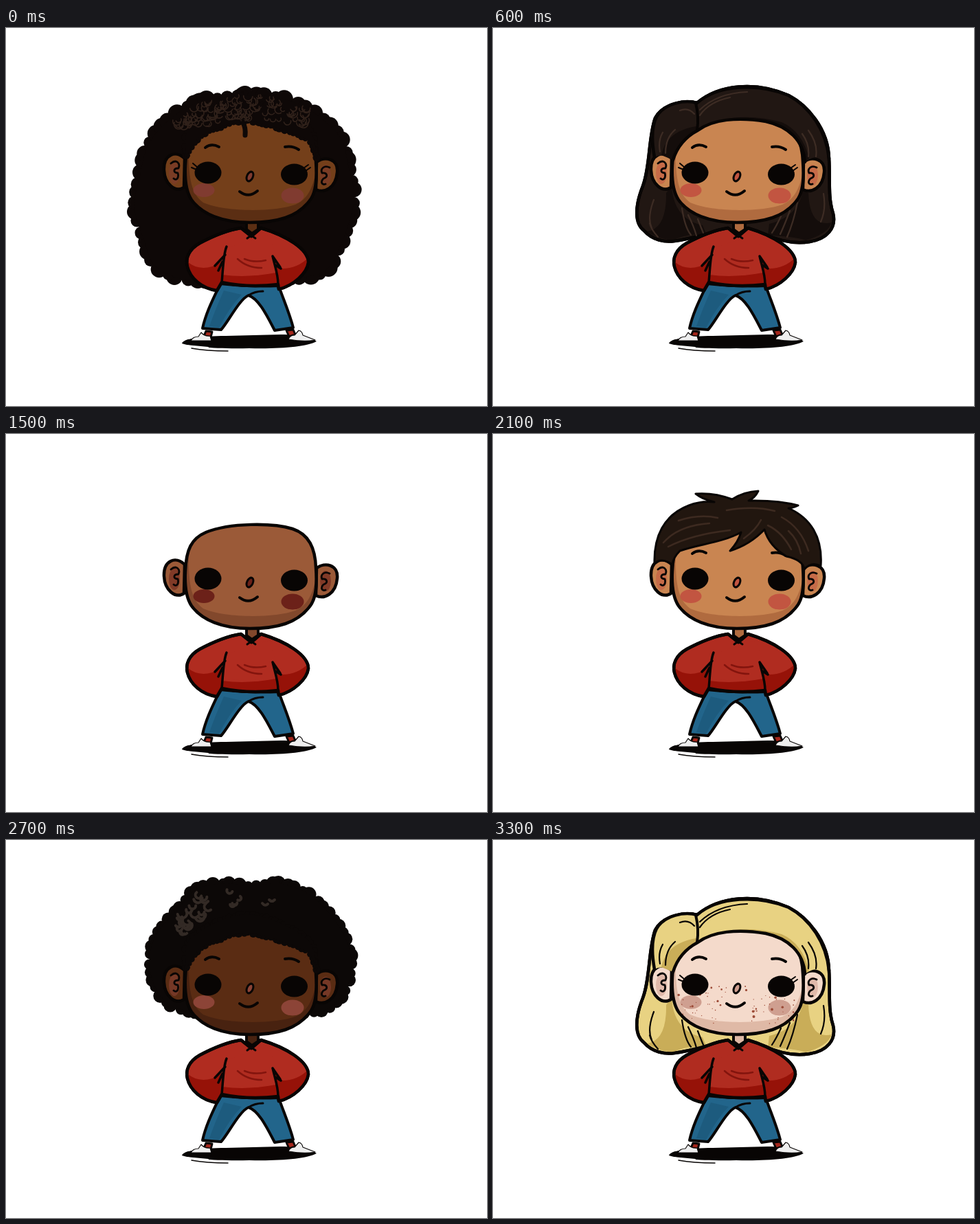
Write an HTML page that moves like this. It is 700 by 550 pixels and loops after 3.6 s.

```html
<!DOCTYPE html>
<html lang="en">
<head>
<meta charset="utf-8">
<title>Characters</title>
<style>
html, body { margin: 0; width: 100%; height: 100%; overflow: hidden; background: #fff; }
svg { display: block; width: 100%; height: 100%; }
</style>
</head>
<body>
<svg id="stage" viewBox="0 0 700 550" stroke-linecap="round" stroke-linejoin="round"></svg>
<script>
const INK = '#080504';
const HOLD = 300;
const NS = 'http://www.w3.org/2000/svg';
const stage = document.getElementById('stage');

const path = (d, fill = 'none', width = 0, line = INK, extra = '') =>
  `<path d="${d}" fill="${fill}" stroke="${width ? line : 'none'}" stroke-width="${width}" ${extra}/>`;
const oval = (x, y, rx, ry, fill, extra = '') =>
  `<ellipse cx="${x}" cy="${y}" rx="${rx}" ry="${ry}" fill="${fill}" ${extra}/>`;
const times = (n, fn) => Array.from({ length: n }, (_, i) => fn(i)).join('');

function random(seed) {
  return () => {
    seed = (seed * 1664525 + 1013904223) % 4294967296;
    return seed / 4294967296;
  };
}

// Smooth curve through "x y x y ..."
function spline(text) {
  const n = text.trim().split(/\s+/).map(Number);
  const last = n.length / 2 - 1;
  const at = i => { const k = 2 * Math.max(0, Math.min(last, i)); return [n[k], n[k + 1]]; };
  let d = `M${at(0)}`;
  for (let i = 0; i < last; i++) {
    const [a, b, c, e] = [at(i - 1), at(i), at(i + 1), at(i + 2)];
    const near = b.map((v, k) => v + (c[k] - a[k]) / 6);
    const far = c.map((v, k) => v - (e[k] - b[k]) / 6);
    d += `C${near} ${far} ${c}`;
  }
  return d;
}
const region = (outer, inner) => spline(outer) + spline(inner).replace('M', 'L') + 'Z';

function measure(d) {
  const el = document.createElementNS(NS, 'path');
  el.setAttribute('d', d);
  const length = el.getTotalLength();
  return { length, at: t => el.getPointAtLength(t * length) };
}

// Outer runs left to right, inner runs back; u goes from outer to inner
function band(outer, inner) {
  const a = measure(spline(outer)), b = measure(spline(inner));
  return (t, u) => {
    const p = a.at(t), q = b.at(1 - t);
    return [p.x + (q.x - p.x) * u, p.y + (q.y - p.y) * u];
  };
}

// Filled shape with a scalloped edge
function curly(d, r, fill, width = 0, seed = 7) {
  const rnd = random(seed), edge = measure(d);
  const count = Math.round(edge.length / (r * 1.35));
  return times(count, i => {
    const p = edge.at((i + rnd() * 0.5) / count), s = r * (0.75 + rnd() * 0.45);
    return oval(p.x.toFixed(1), p.y.toFixed(1), s.toFixed(1), s.toFixed(1), fill,
      width ? `stroke="${INK}" stroke-width="${width}"` : '');
  }) + path(d, fill);
}

function curls(at, n, color, width, seed, t0 = 0, t1 = 1, u0 = 0, u1 = 1) {
  const rnd = random(seed);
  return times(n, () => {
    const [x, y] = at(t0 + (t1 - t0) * rnd(), u0 + (u1 - u0) * rnd());
    const s = 3 + rnd() * 4, turn = rnd() * 120 - 60;
    return path(`M${-s} 0A${s} ${s} 0 0 0 ${s} 0`, 'none', width, color,
      `transform="translate(${x.toFixed(1)} ${y.toFixed(1)}) rotate(${turn.toFixed(0)})"`);
  });
}

const HEAD = 'M261 200C262 168 270 152 291 143C326 129 388 129 417 138C441 146 450 166 451 195C453 222 451 240 442 251C424 275 395 283 355 283C315 283 285 271 270 250C262 238 260 220 261 200Z';
const SWEATER = 'M342 291C322 294 299 304 282 313C266 322 261 335 264 347C268 364 285 379 307 382L314 370C342 376 372 376 396 373L397 380C418 375 438 357 440 341C440 322 408 302 371 291L357 303Z';
const PANTS = 'M312 372Q355 377 397 375C402 391 412 413 418 436L391 440C380 419 368 394 353 389C340 394 322 430 313 439L286 437C291 414 302 393 312 372Z';

const body =
  path('M256 459C258 452 282 448 320 448L400 446C428 446 444 450 452 456C437 464 400 467 354 466C305 467 270 464 256 459Z', INK) +
  path('M262 462L294 465M258 453L276 450', 'none', 2, '#fff') +
  path('M270 466Q292 470 323 470', 'none', 1.5) +
  path('M291 441L300 442L298 450L288 448ZM408 440L418 439L421 446L412 449Z', '#a4261b', 3) +
  path('M269 455Q272 449 280 449L284 443Q289 449 297 448L299 455Z', '#eee', 1.2) +
  path('M411 453Q413 447 420 447L426 440Q431 441 432 447L450 454Q434 457 411 453Z', '#eee', 1.2) +
  path(PANTS, '#22658b', 4) +
  path('M317 382Q306 406 296 434L310 436Q326 405 343 388Z', '#1d5b7e') +
  path('M353 389Q362 383 374 383', 'none', 3) +
  path(SWEATER, '#b02c20', 4.5) +
  `<g clip-path="url(#sweater)">` +
  path('M264 340Q279 353 300 347L313 340L315 359Q350 364 393 356L389 334L402 350Q425 350 441 333L438 389L260 389Z', '#961208') +
  path('M315 360Q335 354 350 359Q370 362 391 352L392 330L384 300L320 320Z', '#b02c20') + '</g>' +
  path(SWEATER, 'none', 4.5) +
  path('M321 318C316 330 316 350 314 370M319 330L304 346M315 340L309 353M388 332C391 346 396 358 396 373M388 332L399 348M392 345L400 350', 'none', 3.5) +
  path('M337 336Q351 349 372 349M347 336Q361 342 378 338', 'none', 2.5, '#83140d') +
  path('M350 282V293L358 299L367 293V282Z', 'var(--shade)', 4) +
  path('M342 291L363 306M371 291L351 306', 'none', 3);

function freckles() {
  const rnd = random(21);
  return times(95, () => {
    const x = 270 + rnd() * 176, y = 213 + rnd() * 54;
    const mid = Math.abs(x - 354) < 18 && y > 224;
    return mid ? '' : oval(x.toFixed(1), y.toFixed(1), ...Array(2).fill((0.6 + rnd() ** 3 * 1.5).toFixed(1)), '#9c4a36');
  });
}

function face(look) {
  const { skin, shade, cheek } = look;
  return path('M260 190C247 177 229 184 230 207C231 227 246 240 259 232ZM452 195C464 186 484 190 482 210C480 233 463 241 451 235Z', skin, 4.5) +
    oval(245, 211, 8, 16, cheek, 'opacity=".55"') + oval(465, 214, 8, 15, cheek, 'opacity=".55"') +
    path('M240 197C248 190 254 197 251 204C243 204 243 211 250 211C252 218 248 223 244 219M471 203C463 199 457 205 460 211C468 210 469 217 462 219C457 224 460 229 465 227', 'none', 2.8) +
    path(HEAD, skin) +
    path('M255 165H266C265 215 268 240 287 254C318 268 390 268 421 257C441 248 447 230 452 205V300H255Z', shade, 0, INK, 'clip-path="url(#head)"') +
    oval(288, 236, 15.5, 10, cheek) + oval(417, 244, 16.5, 11.5, cheek) +
    (look.freckles ? freckles() : '') +
    path(HEAD, 'none', 4.5) +
    oval(294, 210.5, 19.5, 16, INK) + oval(419.5, 213, 19.5, 15.5, INK) +
    (look.lashes ? path('M272 197L279 203M270 203L277 206M443 203L436 208M440 199L433 204', 'none', 2) : '') +
    oval(355, 216, 4.3, 7.3, look.nose || cheek, `stroke="${INK}" stroke-width="3" transform="rotate(25 355 216)"`) +
    path('M340 238Q353 248 366 237', 'none', 4) +
    (look.brows === false ? '' : path('M290 174Q299 167 310 173M406 173Q417 171 426 177', 'none', 4));
}

const HAIRLINE = '452 190 440 164 400 147 350 140 310 145 280 160 262 188';
const CAP = '262 186 270 142 350 108 436 142 452 188';
const crown = color => curly(region(CAP, HAIRLINE.replace('350 140', '350 135')), 5, color);

function bigCurls() {
  const dark = '#0e0807', top = band('240 135 290 104 350 97 395 98 440 118', '435 140 350 135 260 145');
  const edge = '345 98 395 101 438 117 470 141 490 165 498 200 507 245 497 290 484 322 468 350 436 362 350 366 268 366 240 360 214 343 203 315 187 262 195 215 207 170 238 133 278 108 312 102 345 98';
  return {
    back: curly(spline(edge) + 'Z', 11, dark),
    front: crown(dark) + curls(top, 120, '#31221b', 1.6, 5) +
      path('M345 138Q349 145 348 156', 'none', 7, dark) +
      path('M274 101Q283 94 297 102M338 92Q348 84 355 91', 'none', 7, dark)
  };
}

function gingerCurls() {
  const outer = '229 183 236 150 262 121 296 107 350 97 395 100 443 117 469 143 478 184';
  const inner = '452 182 440 167 412 151 380 142 350 138 320 145 290 157 271 172 262 184';
  const at = band(outer, inner), d = region(outer, inner);
  const low = '445 117 469 143 478 184', under = '452 182 440 167 412 151 380 142 345 136 380 124 410 136 438 142';
  return {
    front: curly(d, 9, '#f27a17', 4) +
      path(region(low, under), '#a5460f') +
      path('M262 184Q285 151 345 137L322 133Q280 145 249 176Z', '#c75511') +
      curls(at, 55, '#ffa044', 2, 9, 0, 0.75, 0, 0.6) +
      curls(at, 65, INK, 2.4, 12)
  };
}

function dread(x, y, end, k) {
  const wave = `M${x} ${y}q${k % 2 ? 4 : -4} ${(end - y) / 4} 0 ${(end - y) / 2}t0 ${(end - y) / 2}`;
  const ticks = times(Math.floor((end - y) / 8), i => path(`M${x - 3} ${y + 6 + i * 8}l6 4`, 'none', 2));
  return path(wave, 'none', 12) + path(wave, 'none', 6.5, '#ad651d') + ticks;
}

function dreads() {
  const outer = '250 198 253 168 275 133 310 112 350 104 390 109 425 127 452 158 463 196';
  const inner = '452 195 440 171 418 154 388 141 352 137 318 143 290 156 270 176 262 195';
  const at = band(outer, inner), n = 25;
  const ends = [[251, 232, 302], [268, 250, 303], [287, 264, 306], [308, 276, 300], [322, 280, 296], [388, 280, 296],
    [402, 278, 300], [416, 270, 302], [430, 260, 306], [446, 248, 302], [461, 234, 306]];
  return {
    back: ends.map((e, k) => dread(...e, k)).join(''),
    front: times(n, i => { const [x, y] = at((i + 0.5) / n, 0); return oval(x, y, 7, 7, '#ad651d', `stroke="${INK}" stroke-width="4"`); }) +
      path(region(outer, inner), '#ad651d', 4) +
      times(n, i => {
        const t = i / n, [a, b, c] = [at(t, 0), at(t + 0.015, 0.5), at(t, 1)];
        const [e, f] = [at(t + 0.02, 0.45), at(t + 0.02, 0.9)];
        return path(`M${e}L${f}`, 'none', 3, '#713a10') + path(`M${a}Q${b} ${c}`, 'none', 3);
      })
  };
}

function shortHair() {
  const dark = '#21160f';
  const d = 'M235 188C234 150 248 118 285 104Q303 97 322 99Q305 95 295 87Q322 85 348 95Q365 84 386 83Q381 93 372 97Q415 96 444 104Q436 108 430 108C462 122 480 150 477 192Q463 185 453 197Q451 183 427 178Q402 163 395 139Q374 161 345 170Q357 157 361 143C334 158 300 160 272 170Q262 180 261 190Q246 179 235 188Z';
  return {
    front: path(d, dark, 3) +
      path('M248 158Q270 133 315 130M255 164Q290 146 345 140M270 126Q300 116 327 122M365 152Q383 139 390 125M400 133Q421 143 434 168M420 121Q448 136 459 170M340 111Q380 104 410 112M430 141Q444 154 448 174', 'none', 2.5, '#3d2a20')
  };
}

function afro() {
  const dark = '#0c0807', shine = '#332a25';
  const edge = '395 62 436 76 467 103 490 135 502 170 498 210 480 236 450 250 350 255 258 247 228 231 212 200 209 170 220 135 251 100 276 72 320 63 352 67 395 62';
  const at = band('222 142 260 95 300 70 340 72', '340 92 300 103 265 135');
  return {
    back: curly(spline(edge) + 'Z', 9, dark),
    front: crown(dark) + curls(at, 26, shine, 4, 3) + path('M373 92q4 5 8 1M383 87q4 4 8 0', 'none', 4, shine)
  };
}

function bob(fill, dark, line = INK) {
  const back = 'M297 109C279 104 246 111 236 131C226 158 229 201 218 230C206 260 206 285 220 295C232 309 251 312 264 310Q285 307 310 300H395Q430 316 461 311C486 307 500 291 495 270C487 246 491 217 489 190C488 146 457 112 430 98C382 77 329 82 297 109Z';
  const front = 'M297 109C328 82 386 80 430 98C462 115 485 150 486 190Q469 183 454 195C452 164 430 143 397 136C356 129 319 133 298 149C277 160 267 176 262 192Q248 181 235 188C231 166 231 143 238 129C250 109 279 104 297 109Z';
  return {
    back: path(back, fill, 4.5) +
      path('M260 230Q263 278 305 287L312 304Q287 296 262 309Q240 307 224 296Q253 292 252 240ZM451 236Q444 275 402 285L400 302Q438 303 455 309Q487 300 493 283Q461 291 459 240Z', dark) +
      path(back, 'none', 4.5) +
      path('M275 262Q279 290 288 301M284 272Q292 288 296 302M298 278Q303 291 306 298M432 266Q424 287 418 300M419 274Q412 289 406 298M443 254Q437 284 428 304M234 250Q224 276 231 291M481 241Q485 264 477 282M240 304Q230 293 228 284', 'none', 2.2, line),
    front: path(front, fill) +
      path('M298 148Q350 118 420 137Q450 150 460 190L454 195Q450 150 397 136Q340 127 298 148ZM245 185Q252 150 296 143L298 149Q268 163 262 192Z', dark) +
      path('M297 109C328 82 386 80 430 98C462 115 485 150 489 190M235 188C231 166 231 143 238 129C250 109 279 104 297 109M454 195C452 164 430 143 397 136C356 129 319 133 298 149C277 160 267 176 262 192', 'none', 4.5) +
      path('M295 109Q300 130 297 149', 'none', 4) +
      path('M301 119Q326 95 370 93M301 127Q315 107 345 101M272 120Q284 115 293 125M251 182Q251 160 265 148M243 180Q240 164 247 152M450 154Q461 169 459 187M459 149Q473 168 470 187', 'none', 2.2, line)
  };
}

function wavy() {
  const outer = '222 188 228 150 255 116 300 99 350 97 410 101 455 122 478 155 483 188';
  const inner = '452 188 438 163 400 146 350 148 310 142 280 160 262 188';
  return { front: curly(region(outer, inner), 8, '#4a2a18', 3.5, 4) + curls(band(outer, inner), 45, '#22120a', 2.4, 6) };
}

function topBun() {
  const outer = '240 190 250 150 285 118 350 108 420 118 455 150 468 190';
  return {
    back: oval(354, 70, 44, 43, '#1c1311', `stroke="${INK}" stroke-width="4"`),
    front: path(region(outer, HAIRLINE), '#1c1311', 4) +
      path('M272 164Q290 132 335 114M310 142Q325 125 345 114M400 144Q385 124 365 114M438 160Q418 130 375 114M325 68Q350 42 380 66M330 86Q354 62 382 88', 'none', 2.4, '#3b2a22')
  };
}

function puffs() {
  const dark = '#100a08';
  const puff = x => curly(`M${x - 36} 98a36 36 0 1 1 72 0a36 36 0 1 1 -72 0Z`, 9, dark);
  return { back: puff(254) + puff(466), front: path(region('258 190 262 150 300 127 354 122 410 127 450 150 455 190', HAIRLINE), dark, 4) };
}

const tone = (skin, shade, cheek) => ({ skin, shade, cheek });
const fair = tone('#f4dacb', '#dfb9a6', '#cf9f90');
const tan = tone('#c98551', '#b06b3f', '#c25541');
const brown = tone('#9b5a38', '#82482c', '#6c2119');
const deep = tone('#743f1a', '#5b2e13', '#803b30');
const dark = tone('#5a2c13', '#482210', '#8c4437');

const looks = [
  { ...deep, lashes: true, ...bigCurls() },
  { ...fair, freckles: true, ...gingerCurls() },
  { ...tan, lashes: true, ...bob('#211713', '#140d0b', '#3d2c24') },
  { ...tan, ...dreads() },
  { ...fair, ...wavy() },
  { ...brown, brows: false },
  { ...tan, lashes: true, ...topBun() },
  { ...tan, ...shortHair() },
  { ...fair, lashes: true, ...bob('#7b3d1d', '#55270f') },
  { ...dark, ...afro() },
  { ...brown, lashes: true, ...puffs() },
  { ...fair, freckles: true, lashes: true, ...bob('#e8d282', '#c9ad58') }
];

stage.innerHTML =
  `<defs><clipPath id="head"><path d="${HEAD}"/></clipPath><clipPath id="sweater"><path d="${SWEATER}"/></clipPath></defs>` +
  looks.map(look => `<g style="--shade:${look.shade}">${look.back || ''}${body}${face(look)}${look.front || ''}</g>`).join('');
const groups = stage.querySelectorAll(':scope > g');

function draw(now) {
  const current = Math.floor(now / HOLD) % looks.length;
  groups.forEach((g, i) => { g.style.display = i === current ? '' : 'none'; });
}

const start = performance.now();
function tick() {
  draw(performance.now() - start);
  requestAnimationFrame(tick);
}
tick();
</script>
</body>
</html>
```
